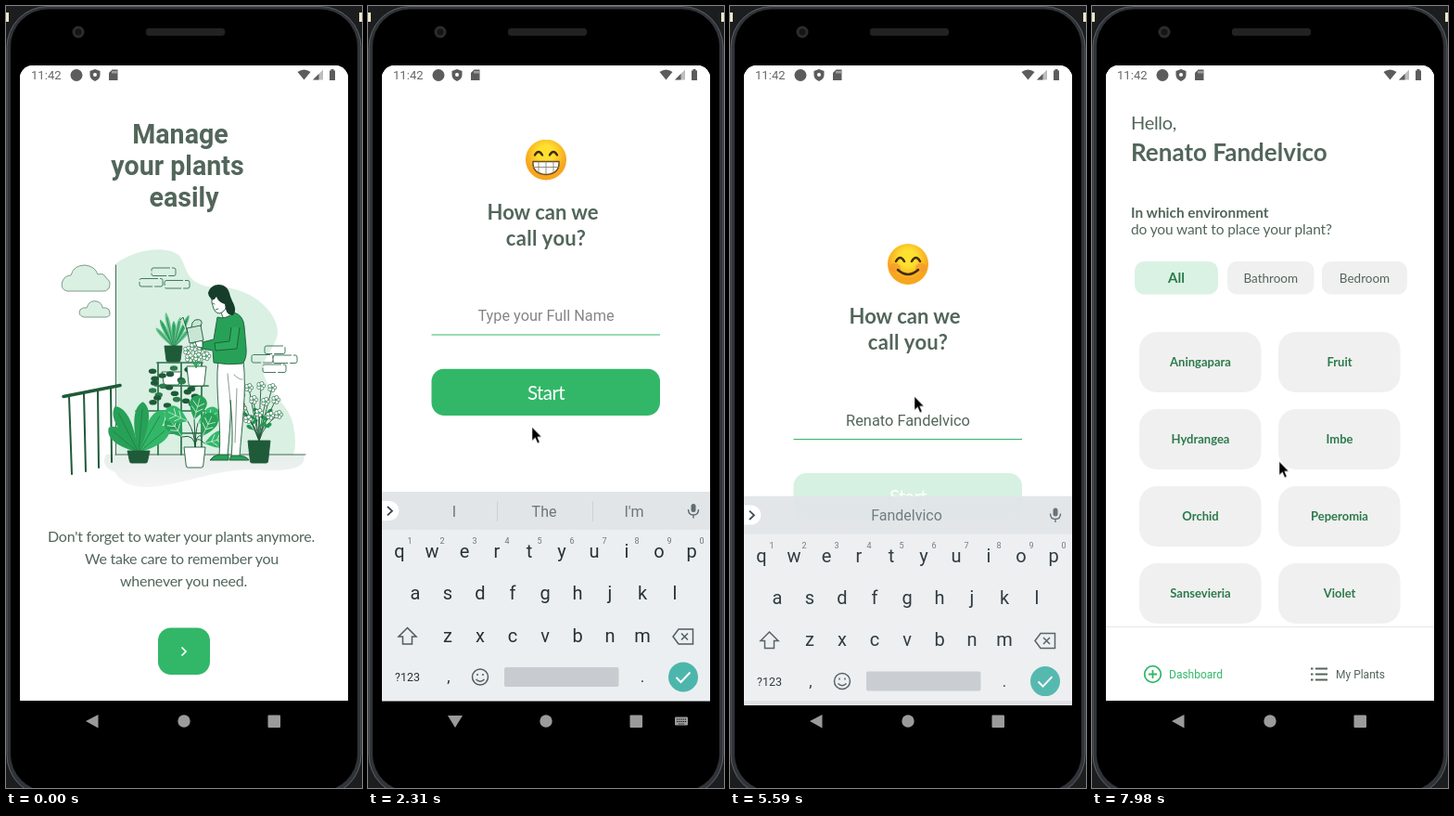
These frames come from a looping animation (384 by 842 pixels, 8000 ms). An HTML page:

```html
<!DOCTYPE html>
<html lang="en">
<head>
<meta charset="utf-8">
<title>Plant care app</title>
<style>
@property --r2 { syntax: '<number>'; inherits: true; initial-value: 0; }
@property --r3 { syntax: '<number>'; inherits: true; initial-value: 0; }
@property --r4 { syntax: '<number>'; inherits: true; initial-value: 0; }
html, body { margin: 0; width: 100%; height: 100%; overflow: hidden; background: #1c1d1f; }
svg { display: block; width: 384px; height: 842px; animation: r2 8s infinite, r3 8s infinite, r4 8s infinite; }
text { font-family: Lato, sans-serif; fill: #52665a; white-space: pre; }
.mid { text-anchor: middle; }
.b { font-weight: 700; }
.rb, .rb text { font-family: Roboto, sans-serif; }
.dark { fill: #2b7a4b; }
.white { fill: #fff; }
#keys text { fill: #263238; }
#keys #tips text, #keys .digit { fill: #6c767c; }

/* each page rises from the bottom while the one below is shaded and nudged up */
.page { --in: 1; --out: 0; transform: translateY(calc((1 - var(--in)) * 685px)); }
.card { transform: translateY(calc((1 - var(--in)) * -61px - var(--out) * 13.7px)); }
.shade { opacity: min(.1, calc(var(--out) * .278)); }
#p1 { --out: var(--r2); }
#p2 { --in: var(--r2); --out: var(--r3); }
#p3 { --in: var(--r3); --out: var(--r4); }
#p4 { --in: var(--r4); }
@keyframes r2 { 0%, 12.59% { --r2: 0; animation-timing-function: cubic-bezier(.208,.82,.25,1); } 17.903%, 100% { --r2: 1; } }
@keyframes r3 { 0%, 71.15% { --r3: 0; animation-timing-function: cubic-bezier(.208,.82,.25,1); } 76.463%, 100% { --r3: 1; } }
@keyframes r4 { 0%, 85.063% { --r4: 0; animation-timing-function: cubic-bezier(.208,.82,.25,1); } 90.375%, 100% { --r4: 1; } }

#go { animation: go 8s linear infinite; }
@keyframes go { 0%, 9.4% { opacity: 1; } 10.8%, 100% { opacity: .7; } }
#start { animation: start 8s linear infinite; }
@keyframes start { 0%, 67.5% { opacity: 1; } 69.4%, 100% { opacity: .2; } }
#confirm { animation: confirm 8s linear infinite; }
@keyframes confirm { 0%, 79.8% { opacity: 1; } 81.6%, 100% { opacity: .2; } }

#form { animation: lift 8s step-end infinite; }
@keyframes lift { 0% { transform: none; } 25.5% { transform: translateY(-112.5px); } 69.4% { transform: none; } }
.typing { animation: typing 8s step-end infinite; }
@keyframes typing { 0% { opacity: 0; } 25% { opacity: 1; } 69.4% { opacity: 0; } }
.idle { animation: idle 8s step-end infinite; }
@keyframes idle { 0% { opacity: 1; } 25% { opacity: 0; } 69.4% { opacity: 1; } }
#keys { animation: keys 8s linear infinite; }
@keyframes keys {
  0%, 24.4% { opacity: 0; transform: translateY(40px); animation-timing-function: ease-out; }
  27.5%, 69.4% { opacity: 1; transform: none; }
  70.2% { opacity: .92; transform: translateY(7.5px); }
  72%, 100% { opacity: 0; transform: translateY(40px); }
}
#list { animation: list 8s step-end infinite; }
@keyframes list { 0% { opacity: 0; } 98.375% { opacity: 1; } }

#mouse { animation: mouse 8s ease-in-out infinite; }
@keyframes mouse {
  0%, 2.3% { transform: translate(420px, 780px); animation-timing-function: step-end; }
  2.375% { transform: translate(366px, 760px); animation-timing-function: ease-out; }
  10.5%, 13.75% { transform: translate(201px, 695px); }
  19.6%, 61% { transform: translate(177px, 453.5px); }
  66.5%, 70.2% { transform: translate(199px, 420.5px); }
  75% { transform: translate(208px, 541px); }
  81%, 100% { transform: translate(202px, 490.5px); }
}
</style>
</head>
<body>
<svg viewBox="0 0 384 842">
<defs>
  <clipPath id="glass"><path d="M15 748V78A14 14 0 0 1 29 64H355A14 14 0 0 1 369 78V748Z"/></clipPath>
  <clipPath id="sheet"><rect x="15" y="64" width="354" height="685"/></clipPath>
  <radialGradient id="sun" cy=".35"><stop offset=".4" stop-color="#fde030"/><stop offset="1" stop-color="#f7a61f"/></radialGradient>
  <linearGradient id="floor" x2="0" y2="1"><stop stop-color="#e6eeea"/><stop offset="1" stop-color="#f5f5f5"/></linearGradient>
  <g id="grin">
    <circle r="22" fill="url(#sun)"/>
    <path d="M-12-5q4-7 8 0M4-5q4-7 8 0" fill="none" stroke="#422b0d" stroke-width="2.4" stroke-linecap="round"/>
    <path d="M-14 2H14Q15 15 0 16Q-15 15-14 2Z" fill="#fff" stroke="#6b4a1e" stroke-width="1.4"/>
    <path d="M-14 8H14M-8 2V14M0 2V16M8 2V14" stroke="#8b8378" stroke-width=".9"/>
  </g>
  <g id="smile">
    <circle r="22" fill="url(#sun)"/>
    <ellipse cx="-14" cy="4" rx="6" ry="5" fill="#f5962b" opacity=".7"/><ellipse cx="14" cy="4" rx="6" ry="5" fill="#f5962b" opacity=".7"/>
    <path d="M-13-3q4.500-8 9 0M4-3q4.500-8 9 0M-11 6Q0 16 11 6" fill="none" stroke="#422b0d" stroke-width="2.5" stroke-linecap="round"/>
  </g>
  <g id="happy">
    <circle r="22" fill="url(#sun)"/>
    <ellipse cx="-6.500" cy="-7" rx="3" ry="5.200" fill="#422b0d"/><ellipse cx="6.500" cy="-7" rx="3" ry="5.200" fill="#422b0d"/>
    <path d="M-14 3H14Q12 18 0 18T-14 3Z" fill="#4a2a12"/><path d="M-12.500 3H12.500L11 8H-11Z" fill="#fff"/><path d="M-7 15Q0 9 7 15Q0 20-7 15Z" fill="#e8453c"/>
  </g>
</defs>

<!-- handset -->
<path d="M0 7h3v10h-3zM381 7h3v10h-3z" fill="#ece7c8"/>
<rect x="1" y=".5" width="382" height="850" rx="44" fill="#303338" stroke="#5d6066"/>
<rect x="5" y="3.500" width="374" height="842" rx="40"/>
<circle cx="78" cy="28" r="6.500" fill="#2c2c2e"/><circle cx="78" cy="28" r="3.500" fill="#141518"/>
<rect x="151" y="24" width="85" height="8" rx="3" fill="#222224"/>

<g clip-path="url(#glass)">
<rect x="15" y="64" width="354" height="685" fill="#fff"/>

<g id="p1" class="page" clip-path="url(#sheet)"><g class="card">
  <rect x="15" y="40" width="354" height="760" fill="#fff"/>
  <g class="rb mid b" font-size="28.600"><text x="188" y="147.500">Manage</text><text x="185" y="181.500">your plants</text><text x="192" y="215.500">easily</text></g>
  <g id="art"></g>
  <g class="mid" font-size="16" letter-spacing="-.25"><text x="189" y="576.500">Don't forget to water your plants anymore.</text><text x="189.500" y="600.500">We take care to remember you</text><text x="191.500" y="624.500">whenever you need.</text></g>
  <g id="go"><rect x="164" y="669.500" width="56" height="50.500" rx="14" fill="#32b768"/><path d="M189.500 690.500l4.500 4.500-4.500 4.500" fill="none" stroke="#fff" stroke-width="1.700"/></g>
</g><rect class="shade" x="15" y="64" width="354" height="685"/></g>

<g id="p2" class="page" clip-path="url(#sheet)"><rect x="15" y="64" width="354" height="685" fill="#fff"/><g class="card"><g id="form">
  <use id="face" href="#grin" x="192" y="278"/>
  <g class="mid b" font-size="22"><text x="188.500" y="342">How can we</text><text x="192" y="370" letter-spacing=".3">call you?</text></g>
  <text id="hint" class="rb mid" x="192" y="451.500" font-size="16.300" style="fill:#858585">Type your Full Name</text>
  <text id="name" class="rb mid" x="192" y="451.500" font-size="16.400"><tspan id="done"></tspan><tspan id="word"></tspan></text>
  <rect id="caret" y="434" width="1.800" height="23" fill="#1c8577"/>
  <path id="rule" d="M68.500 466.500H315" stroke-width="1.200"/>
  <g id="start"><rect x="68.500" y="503" width="246.500" height="50.500" rx="14" fill="#32b768"/><text class="mid white" x="192" y="536" font-size="20.500" letter-spacing="-.6">Start</text></g>
</g></g><rect class="shade" x="15" y="64" width="354" height="685"/></g>

<g id="p3" class="page" clip-path="url(#sheet)"><rect x="15" y="64" width="354" height="685" fill="#fff"/><g class="card">
  <use href="#happy" transform="translate(192 303) scale(.77)"/>
  <text class="mid b" x="191.500" y="355.500" font-size="21.300">Okay</text>
  <g class="mid" font-size="20" letter-spacing="-.4"><text x="191.500" y="402">Now let's take care of your</text><text x="192" y="431.500">plants carefully</text></g>
  <g id="confirm"><rect x="137" y="456" width="110" height="50.500" rx="14" fill="#32b768"/><text class="mid white" x="192" y="489" font-size="21" letter-spacing="-.2">Confirm</text></g>
</g><rect class="shade" x="15" y="64" width="354" height="685"/></g>

<g id="p4" class="page" clip-path="url(#sheet)"><rect x="15" y="64" width="354" height="685" fill="#fff"/><g class="card">
  <g id="list">
    <text x="42" y="133" font-size="20" letter-spacing="-.3">Hello,</text>
    <text class="b" x="42" y="166.500" font-size="26">Renato Fandelvico</text>
    <text class="b" x="42" y="228" font-size="15.400">In which environment</text>
    <text x="42" y="246" font-size="15.500" letter-spacing="-.12">do you want to place your plant?</text>
  </g>
  <path d="M15 668.500H369" stroke="#e6e6e6"/>
  <g fill="none" stroke="#32b768" stroke-width="1.800"><circle cx="65.500" cy="719.500" r="8.800"/><path d="M61 719.500h9M65.500 715v9"/></g>
  <path d="M236 713.500h2.500M241 713.500h13M236 719.500h2.500M241 719.500h13M236 725.500h2.500M241 725.500h13" stroke="#52665a" stroke-width="1.900"/>
  <g class="rb" font-size="12"><text x="83" y="724" style="fill:#32b768">Dashboard</text><text x="263" y="724">My Plants</text></g>
</g></g>

<!-- status bar -->
<g fill="#5c5c5c">
  <text class="rb" x="27" y="79" font-size="13.100" style="fill:#666">11:42</text>
  <circle cx="76" cy="74.500" r="6.500"/>
  <path d="M96 68l5.500 2v4.500q-.5 4.500-5.500 6.500q-5-2-5.500-6.500V70Z"/><circle cx="96" cy="74" r="2" fill="#fff"/>
  <path d="M114.500 68.500H120.500V80H111V72Z"/><path d="M115 70v2.500M117 70v2.500M119 70v2.500" stroke="#fff" stroke-width=".8"/>
  <path d="M314.500 71q7-5 14 0L321.500 79.500Z"/>
  <path d="M342 68.500V79.500H331Z" fill="#bdbdbd"/><path d="M337.500 73V79.500H331Z"/>
  <path d="M349 69.500h1.500V68h3v1.500H355V80h-6Z"/>
</g>
</g>

<!-- navigation bar -->
<g fill="#9b9b9b">
  <path class="idle" d="M86 770L99.500 763V777.500Z"/><path class="typing" d="M86 764H102L94 777Z"/>
  <circle cx="192" cy="770" r="6.700"/><rect x="282.500" y="763.500" width="13.500" height="13.500" rx="1"/>
  <g class="typing"><rect x="331" y="765.500" width="14" height="9" rx="1"/><path d="M333 768h10M333 770.500h10M335 773h6" stroke="#000" stroke-dasharray="1.200 1"/></g>
</g>

<g id="keys" class="rb mid">
  <rect x="15" y="523" width="354" height="225.500" fill="#eceff1"/><rect x="15" y="523" width="354" height="41" fill="#e1e5e8"/>
  <path d="M15 533H23a10.500 10.500 0 0 1 0 21H15Z" fill="#fff"/><path d="M21 539l5 4.700-5 4.700" fill="none" stroke="#37474f" stroke-width="1.800"/>
  <rect x="348.500" y="536" width="5" height="9" rx="2.500" fill="#5f6b72"/><path d="M345.500 542q0 6 5.500 6t5.500-6M351 548v3.500" fill="none" stroke="#5f6b72" stroke-width="1.400"/>
  <path id="bars" d="M139.500 533v22M242.500 533v22" stroke="#cdd2d5"/>
  <g id="tips" font-size="16"></g>
  <g fill="none" stroke="#4f5b62" stroke-width="1.500">
    <path d="M42.500 669.500L52 679h-4.500v8h-10v-8H33Z"/>
    <path d="M335 671H350.500V687H335L329 679ZM338 675.500l7 7M345 675.500l-7 7"/>
    <circle cx="121" cy="722.500" r="8.500"/><path d="M116.500 725q4.500 4.500 9 0M118 719v2M124 719v2"/>
  </g>
  <text x="42.500" y="727" font-size="12.500">?123</text>
  <rect x="147" y="712" width="123.500" height="21" rx="2" fill="#c8ccd0"/>
  <circle cx="340" cy="722.500" r="16" fill="#4db6ac"/><path d="M332.500 723l5 5 10-10.500" fill="none" stroke="#fff" stroke-width="2"/>
</g>

<g id="mouse"><path d="M0 0V14.500L3.400 11.400 5.900 17.200 8.200 16.200 5.700 10.600H10.200Z" stroke="#fff" stroke-width=".5"/></g>
</svg>

<script>
const $ = id => document.getElementById(id);
const add = (id, markup) => $(id).insertAdjacentHTML('beforeend', markup);
const box = (x, y, w, h, r, attrs) => `<rect x="${x}" y="${y}" width="${w}" height="${h}" rx="${r}" ${attrs}/>`;
const path = (d, attrs) => `<path d="${d}" ${attrs}/>`;
const label = (x, y, s, size, cls = '') => `<text class="mid ${cls}" x="${x}" y="${y}" font-size="${size}">${s}</text>`;

// illustration
const deep = '#1f5a39', leafy = '#27a157', mint = '#d9f0e3';
const line = (color, width) => `fill="none" stroke="${color}" stroke-width="${width}" stroke-linecap="round"`;
const ink = `stroke="${deep}" stroke-width=".9"`;
const leaf = (x, y, turn, len, w, fill, rib = '#1f7a45') => `<g transform="translate(${x} ${y}) rotate(${turn})">` +
  path(`M0 0C${-w / 2} ${-len * .3} ${-w * 1.3} ${-len * .85} 0 ${-len}C${w * 1.3} ${-len * .85} ${w / 2} ${-len * .3} 0 0Z`, `fill="${fill}"`) +
  path(`M0 0V${-len * .85}`, line(rib, .7)) + '</g>';
const flower = (x, y, r = 2.2) => [0, 1, 2, 3, 4].map(i =>
  `<circle cx="${x + r * Math.cos(i * 1.257)}" cy="${y + r * Math.sin(i * 1.257)}" r="${r * .75}" fill="#fff" stroke="${deep}" stroke-width=".6"/>`).join('') +
  `<circle cx="${x}" cy="${y}" r="${r * .5}" fill="#32b768"/>`;
const pot = (x, y, w, h, fill) => path(`M${x} ${y}h${w}l${-w * .1} ${h - 2}q0 2-2 2h${4 - w * .8}q-2 0-2-2Z`, `fill="${fill}" ${ink}`);
const bricks = list => list.map(([x, y, w]) => box(x, y, w, 8.5, 2, `fill="none" stroke="#477a5e" stroke-dasharray="18 2"`)).join('');

let art = path('M118 278C138 262 174 257 187 269C196 281 192 300 225 303C252 301 282 317 291 341C300 364 274 374 278 396C284 420 306 428 310 452Q314 472 310 483H118Z', `fill="${mint}"`)
  + path('M108 483H321C325 496 309 501 280 500C235 496 208 510 176 515C140 523 124 514 118 502Q101 496 108 483Z', 'fill="url(#floor)"')
  + path('M118.500 279V483M118 483H323', line('#416c55', 1))
  + path('M66 307Q58 305 61 296Q64 290 70 290Q73 279 85 279Q96 280 99 289Q106 287 108 293Q114 296 111 304Q108 308 103 307Z', `fill="${mint}" stroke="#7d9d8b"`)
  + path('M84 335Q77 333 80 327Q83 324 87 325Q90 316 98 318Q104 320 104 325Q112 324 112 331Q112 335 107 335Z', `fill="${mint}" stroke="#7d9d8b"`)
  + bricks([[157, 282, 26], [144, 293.5, 25], [171, 295.5, 27], [279, 366, 22], [265, 375.5, 23], [288, 376, 26], [277, 386, 25]])
  // railing
  + path('M68 420L71 504M84 417L86 501M99 414L100 497M113 411L114 491', line(deep, 2))
  + path('M62 420.500L123 408.500', line(deep, 3.6))
  // stand
  + path('M163 384H212M161 409H218M140 436H236M164 384V483M211 384V483M189 384V483M141 436V483M234 436V483M164 460H211', line('#2d7148', 1.7));

[-42, -26, -13, 0, 12, 25, 40].forEach((a, i) => art += leaf(181, 368, a, 29 + 5 * (i % 3), 3.2, i % 2 ? '#3fb371' : '#66c48e'));
art += pot(171, 366, 19, 17, deep);
// trailing plant
art += pot(168, 394, 21, 14, '#fff');
for (let i = 0; i < 26; i++) {
  const x = 181 + 23 * Math.sin(i * 2.4), y = 390 + i * 1.6;
  art += `<ellipse cx="${x}" cy="${y}" rx="4.2" ry="2.800" fill="${i % 3 ? '#1f5a39' : '#2d7a4c'}"/>`;
}
art += pot(195, 388, 21, 21, '#fff');
[[196, 371], [203, 367], [211, 370], [198, 379], [207, 378], [216, 377]].forEach(([x, y]) =>
  art += path(`M205 389L${x} ${y}`, line(leafy, 1)) + flower(x, y, 2.8));
// broad-leaved plants
[[-50, 42], [50, 43], [-27, 56], [30, 53], [5, 55]].forEach(([a, n], i) => art += leaf(143, 481, a, n, 11, i % 2 ? '#32b768' : leafy));
art += pot(131, 479, 24, 13, deep);
[[190, 464, -35], [196, 447, -65], [203, 445, 15], [207, 449, 62], [212, 463, 25], [214, 471, 75]].forEach(([x, y, a], i) => {
  art += path(`M204 476Q204 460 ${x} ${y}`, line(deep, 1)) + leaf(x, y, a, 27, 13, i % 2 ? '#32b768' : leafy, '#c5ead4');
  art += `<g transform="translate(${x} ${y}) rotate(${a})">` + path('M0-8L-6-13M0-8L6-13M0-14L-6-19M0-14L6-19', line('#c5ead4', .9)) + '</g>';
});
art += pot(192, 475, 23, 22, '#fff');
// flowering plant
[[253, 419], [262, 411], [275, 409], [287, 411], [291, 424], [255, 433], [267, 424], [280, 426], [261, 445], [285, 441], [294, 440], [273, 438]].forEach(([x, y], i) =>
  art += path(`M273 468Q${272 + (x - 272) * .3} 450 ${x} ${y}`, line(deep, .9)) + leaf((x + 273) / 2, (y + 468) / 2, i % 2 ? 55 : -55, 9, 3, leafy) + flower(x, y, 2.7));
art += pot(261, 468, 24, 24, deep);
// gardener
art += path('M229 382C225 412 233 450 230 484H239C241 460 243 440 242 424C244 446 245 466 243 485H252C254 456 260 416 256 381Z', `fill="#fff" ${ink}`)
  + path('M242 426L239 396M246 397q6 6 9 5M249 412L247 470', line('#8b9c92', 1))
  + path('M220 489Q223 484 230 483H240V489ZM241 489L243 484H252Q260 485 262 489Z', `fill="${leafy}" ${ink}`)
  + path('M231 327L243 322L247 333L235 338Z', `fill="#fff" ${ink}`)
  + path('M228 335Q237 338 246 330Q256 333 257 345L259 368Q260 380 255 385Q240 387 224 384L223 371L211 369L212 362L224 359Z', `fill="${leafy}" ${ink}`)
  + path('M252 346L249 369L226 371L225 363L241 361L243 346', `fill="#2cab5e" ${ink}`)
  + path('M212 361q-5-3-8 1l2 5 6 1Z', `fill="#fff" ${ink}`)
  + path('M222 311Q221 320 224 326Q227 333 233 330Q241 324 239 313Z', `fill="#fff" ${ink}`)
  + path('M218 309C221 297 238 297 241 309C243 319 251 325 245 333Q237 334 236 321Q229 319 227 313Q223 319 221 315Q218 312 218 309Z', 'fill="#163d2a"')
  + path('M223 320l2 1M226 327l3-1', line(deep, .8))
  // watering can
  + path('M195 347L210 344L213 360L198 363ZM196 352L191 335L188 338M210 345Q214 336 204 338Q200 340 200 346', `fill="#c9e6d5" ${ink}`);
add('art', art);

// chips and plant cards
[['All', 46, 90], ['Bathroom', 146, 93.5], ['Bedroom', 248, 92]].forEach(([s, x, w], i) =>
  add('list', box(x, 275, w, 35.5, 10, `fill="${i ? '#f0f0f0' : '#daf2e4'}"`) + label(x + w / 2, 298, s, i ? 13.5 : 15, i ? '' : 'b dark')));
'Aningapara Fruit Hydrangea Imbe Orchid Peperomia Sansevieria Violet'.split(' ').forEach((s, i) => {
  const x = i % 2 ? 201 : 51, y = 351 + 83 * (i >> 1);
  add('list', box(x, y, 131.5, 65, 19, 'fill="#f0f0f0"') + label(x + 66, y + 37, s, 13, 'b dark'));
});

// keyboard letters
[['qwertyuiop', 34, 594], ['asdfghjkl', 51, 639], ['zxcvbnm', 86, 684.5]].forEach(([row, x, y], r) =>
  [...row].forEach((c, i) => add('keys', label(x + 35 * i, y, c, 20) + (r ? '' : label(x + 11 + 35 * i, 579, (i + 1) % 10, 9, 'digit')))));
add('keys', label(87, 728, ',', 17) + label(296, 728, '.', 17));

// typing
const fullName = 'Renato Fandelvico';
const strokes = [2510, 2640, 2790, 2890, 2990, 3140, 3235, 3330, 3530, 3600, 3670, 3740, 3800, 3950, 4100, 4165, 4230];
const guesses = ["I The I'm", 'R Re Right', 'Re Red Really', 'Ren Rent Rental', 'Rena Renal Rename', 'Renat Renal Rent',
  'Renato Rental Rent', 'and is the', 'F For From', 'Fa Far Fan', 'Fan Fans Fancy', 'Fand Fandom Hand', 'Fande Fandom Handed'];
let shown = -1;

function type(n) {
  if (n === shown) return;
  shown = n;
  const text = fullName.slice(0, n), cut = text.lastIndexOf(' ') + 1;
  $('done').textContent = text.slice(0, cut);
  $('word').textContent = text.slice(cut);
  $('hint').style.opacity = n ? 0 : 1;
  $('face').setAttribute('href', n ? '#smile' : '#grin');
  const tips = (guesses[n] || text.slice(cut)).split(' ');
  $('bars').style.opacity = tips.length > 1 ? 1 : 0;
  $('tips').innerHTML = tips.map((s, i) => label(tips.length > 1 ? 93 + 97 * i : 190.5, 549.5, s, 16)).join('');
  $('caret').setAttribute('x', n ? 192 + $('name').getComputedTextLength() / 2 : 191);
}

let begin;
function tick(now) {
  begin ??= now;
  const t = (now - begin) % 8000;
  const n = strokes.filter(s => s <= t).length;
  type(n);
  const focused = t >= 1780 && t < 5552;
  const since = t - (n ? strokes[n - 1] : 1780);
  $('caret').style.opacity = focused && since % 1000 < 500 ? 1 : 0;
  $('word').style.textDecoration = focused ? 'underline' : 'none';
  $('rule').style.stroke = t < 1880 ? '#cfcfcf' : '#32b768';
  requestAnimationFrame(tick);
}
requestAnimationFrame(tick);
</script>
</body>
</html>
```
